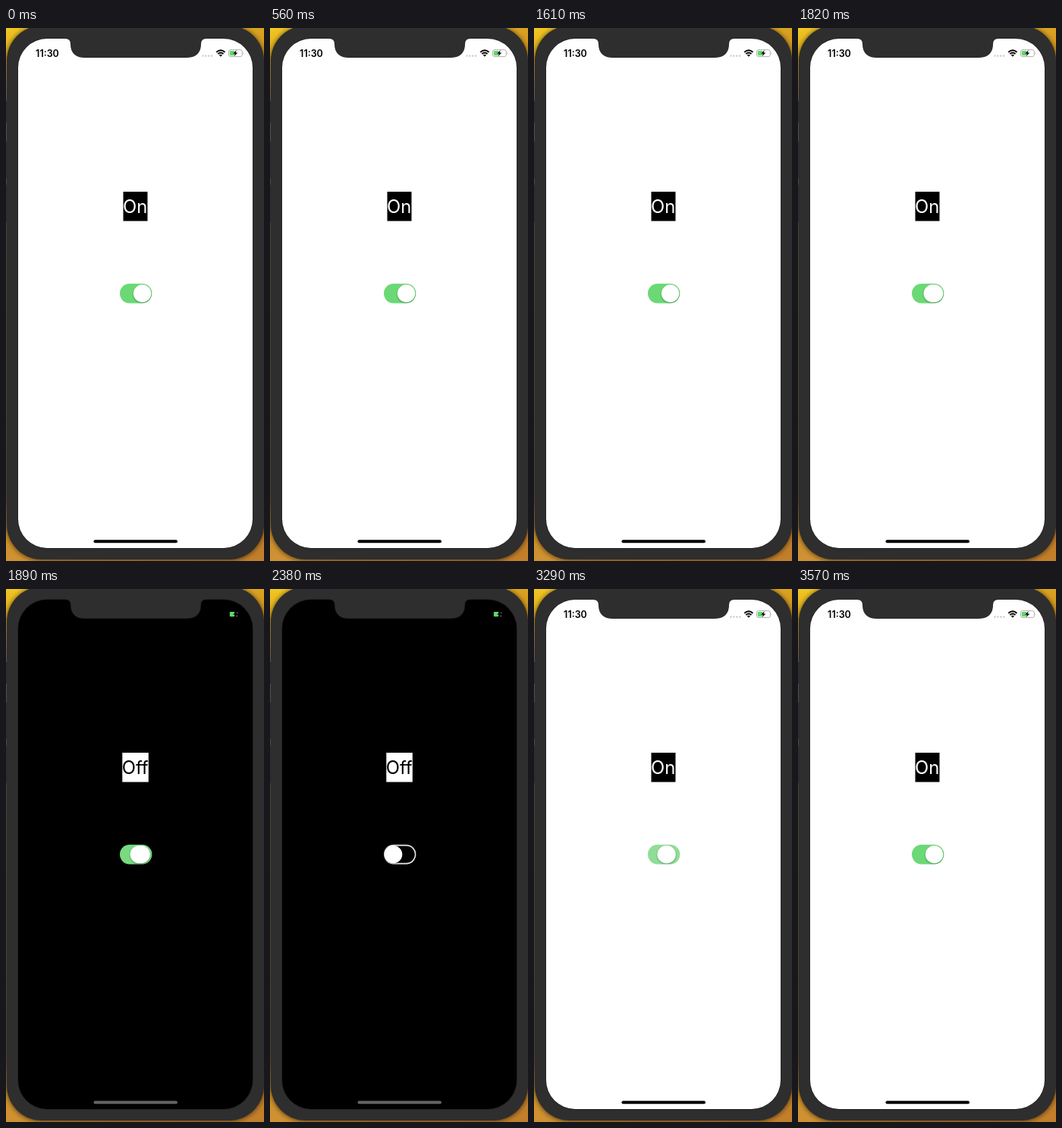
Animation of 340x700 px, one loop 3.64 s. Source, as an HTML page:

```html
<!DOCTYPE html>
<html lang="en">
<head>
<meta charset="utf-8">
<title>Switch</title>
<style>
  html, body { margin: 0; width: 100%; height: 100%; overflow: hidden; background: #2e2e2e; }
  svg { display: block; width: 340px; height: 700px; }
  text { font-family: Inter, "Liberation Sans", sans-serif; }
  .dark .light-only, .dark-only { display: none; }
  .dark .dark-only { display: inline; }
  #screen { fill: #fff; stroke: #222; stroke-width: 1.4; paint-order: stroke; }
  .dark #screen { fill: #000; }
  .dark #home { fill: #626463; }
</style>
</head>
<body>
<svg id="stage" viewBox="0 0 340 700">
  <defs>
    <linearGradient id="wall" x1="0" y1="0" x2="0" y2="1">
      <stop offset="0" stop-color="#f2c624"/>
      <stop offset=".05" stop-color="#dfae1c"/>
      <stop offset=".14" stop-color="#77706a"/>
      <stop offset=".37" stop-color="#665a48"/>
      <stop offset=".88" stop-color="#6b563c"/>
      <stop offset=".95" stop-color="#d0922a"/>
      <stop offset="1" stop-color="#cf9234"/>
    </linearGradient>
    <linearGradient id="warm">
      <stop offset="0" stop-color="#a0501c" stop-opacity="0"/>
      <stop offset="1" stop-color="#a0501c" stop-opacity=".3"/>
    </linearGradient>
    <filter id="soft" x="-30%" y="-30%" width="160%" height="170%">
      <feGaussianBlur stdDeviation="1.1"/>
    </filter>
    <filter id="glow"><feGaussianBlur stdDeviation="3"/></filter>
    <clipPath id="pill"><rect x="150" y="335.8" width="42.4" height="25.6" rx="12.8"/></clipPath>
  </defs>

  <!-- phone shell -->
  <rect width="340" height="700" fill="url(#wall)"/>
  <rect width="340" height="700" fill="url(#warm)"/>
  <g fill="#3a3a3a">
    <rect y="96" width="2" height="28"/>
    <rect y="149" width="2" height="48"/>
    <rect y="206" width="2" height="49"/>
  </g>
  <rect x="1" y="-3" width="339" height="702" rx="46" opacity=".6" filter="url(#glow)"/>
  <rect x="1" y="-3" width="339" height="701" rx="46" fill="#2e2e2e"/>
  <path id="screen" d="M54 14H78Q85 14 85 21C85 33 92 39 104 39H238C250 39 257 33 257 21Q257 14 264 14H287A38 38 0 0 1 325 52V645A38 38 0 0 1 287 683H54A38 38 0 0 1 16 645V52A38 38 0 0 1 54 14Z"/>

  <!-- status bar -->
  <g class="light-only">
    <text x="54.5" y="37.5" font-size="12.5" font-weight="600" text-anchor="middle">11:30</text>
    <path d="M259.5 36.6H272" stroke="#c4c4c4" stroke-width="2.4" stroke-linecap="round" stroke-dasharray="0 3.9"/>
    <g fill="none" stroke="#000" stroke-width="1.9">
      <path d="M277.3 31.7Q282.9 26.8 288.5 31.7"/>
      <path d="M279.3 34Q282.9 30.9 286.5 34"/>
    </g>
    <path d="M280.8 35.5Q282.9 33.8 285 35.5L282.9 37.8Z"/>
    <rect x="293.5" y="28.6" width="17.8" height="9" rx="2.5" fill="none" stroke="#a9a9a9" stroke-width=".9"/>
    <path fill="#a9a9a9" d="M312.3 31.4Q313.7 33.1 312.3 34.8Z"/>
  </g>
  <rect x="294.8" y="29.9" width="6.6" height="6.4" rx="1.2" fill="#62d56d"/>
  <path id="bolt" d="M303.8 28.9L299.2 33.7H301.9L300.7 37.3L305.3 32.5H302.6Z"/>
  <path class="dark-only" d="M304 31.5L305.5 31M303.5 36L305 35" stroke="#ccc" stroke-width=".8"/>

  <!-- label -->
  <g font-size="23.8" text-anchor="middle">
    <g class="light-only">
      <rect x="154.5" y="215" width="32" height="38.5"/>
      <text x="170.2" y="243.3" fill="#fff">On</text>
    </g>
    <g class="dark-only">
      <rect x="153.3" y="215" width="34.5" height="38.5" fill="#fff"/>
      <text x="170.2" y="243.3">Off</text>
    </g>
  </g>

  <!-- switch -->
  <rect id="track" x="150" y="335.8" width="42.4" height="25.6" rx="12.8"/>
  <rect id="hole"/>
  <g clip-path="url(#pill)">
    <rect id="shade" y="338" height="23.2" rx="11.6" opacity=".34" filter="url(#soft)"/>
  </g>
  <rect id="knob" y="337" height="23.2" rx="11.6" fill="#fff"/>

  <rect id="home" x="115.5" y="672.2" width="110.5" height="4" rx="2"/>
</svg>
<script>
const LOOP = 3640, STEP = 70;
const PRESS_1 = 1730, TURN_OFF = 1884, PRESS_2 = 3050, TURN_ON = 3220;
const GREEN = [107, 217, 117], GREY = [234, 234, 235];
const KNOB = 23.4, STRETCH = 4.2;

const byId = id => document.getElementById(id);
const stage = byId("stage"), track = byId("track"), hole = byId("hole");
const knob = byId("knob"), shade = byId("shade");
const lerp = (a, b, p) => a + (b - a) * p;
const set = (el, attrs) => {
  for (const key in attrs) el.setAttribute(key, attrs[key]);
};

// eases towards 1 from start, and back towards 0 from end
function pulse(t, start, end, rise, fall = rise) {
  const up = Math.max(0, Math.min(t, end) - start);
  const down = Math.max(0, t - end);
  return (1 - Math.exp(-up / rise)) * Math.exp(-down / fall);
}

function draw(t) {
  const off = pulse(t, TURN_OFF, TURN_ON, 55);
  const press = pulse(t, PRESS_1, TURN_OFF, 110, 55) + pulse(t, PRESS_2, TURN_ON, 110, 55);
  const open = pulse(t, TURN_OFF, TURN_ON, 110) * (1 - 0.75 * press);

  stage.classList.toggle("dark", t > TURN_OFF && t <= TURN_ON);
  const rgb = GREEN.map((v, n) => Math.round(lerp(v, GREY[n], off)));
  set(track, { fill: `rgb(${rgb})` });

  // the hole shrinks towards the right-hand resting place of the knob
  const w = 39.4 * open, h = 22.6 * open;
  const cx = lerp(179.6, 171.2, open);
  set(hole, { x: cx - w / 2, y: 348.6 - h / 2, width: w, height: h, rx: h / 2 });

  // a pressed knob stretches towards the middle
  const extra = STRETCH * press;
  const span = { x: lerp(167.9 - extra, 150.9, off), width: KNOB + extra };
  set(knob, span);
  set(shade, span);
}

function tick() {
  const t = performance.now() % LOOP;
  draw(Math.floor(t / STEP) * STEP);
  requestAnimationFrame(tick);
}
tick();
</script>
</body>
</html>
```
